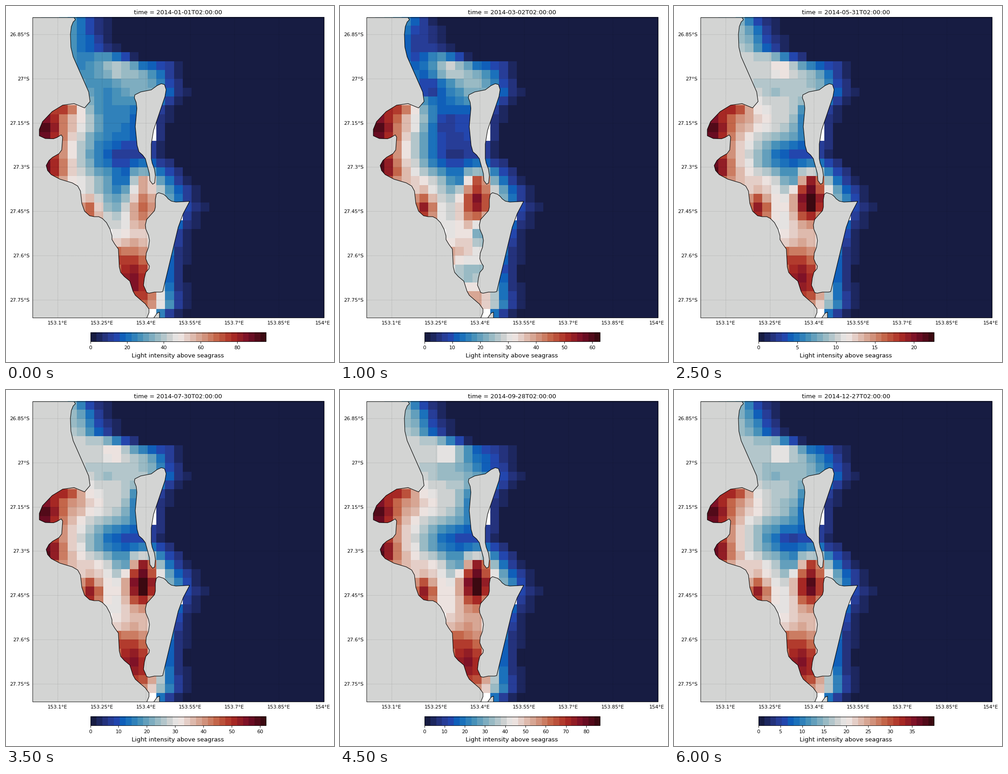
These frames come from a looping animation (718x779 px, 6500 ms). A matplotlib script:

```python
import numpy as np
import matplotlib.pyplot as plt
from matplotlib.animation import FuncAnimation
from matplotlib.colors import LinearSegmentedColormap

W, H, DPI = 718, 779, 64
X0, Y0, X1, Y1 = 57.5, 24.5, 695.7, 682.1    # map box in pixels
BX0, BX1, BY0, BY1 = 184.5, 569, 714.5, 734  # colour bar box
COLS, ROWS = 33, 34
BIG, SMALL = 13.17 * 72 / DPI, 10.97 * 72 / DPI
plt.rcParams["font.family"] = "DejaVu Sans"

STOPS = [(0, "#171c42"), (1 / 11, "#293a8f"), (0.137, "#2446ad"),
         (2 / 11, "#0b66bd"), (3 / 11, "#4590b9"), (4 / 11, "#8eb5c2"),
         (5 / 11, "#d2d4d3"), (0.5, "#f0eceb"), (6 / 11, "#e6d2cc"),
         (7 / 11, "#d59d89"), (8 / 11, "#c46548"), (9 / 11, "#ac2b24"),
         (10 / 11, "#780e28"), (1, "#3c0911")]
CMAP = LinearSegmentedColormap.from_list("balance", STOPS, N=30)
CMAP.set_bad("white")

# Highest light in each month, which sets the colour bar
PEAKS = [95.6, 33.5, 62.8, 76.5, 53, 22.6, 53.9, 62.1, 76.6, 86.8, 78.8, 58, 39.95]

# Column where the bright shallows end, at a few rows
EDGE_ROWS = [0, 3, 4, 5, 7, 8, 10, 12, 15, 17, 19, 21, 24, 28, 32, 33]
EDGE_COLS = [5.3, 6.7, 9.3, 13.8, 14.2, 14.6, 13, 12.2, 12.3, 14.2, 15.7,
             16.4, 15, 13.9, 14.7, 13.5]
FADE = 1.1
BAY_LIGHT = 0.45

# Gaussian mounds: height, centre column and row, widths in both directions
BANKS = [
    (0.50, 0.5, 12, 3, 3), (0.10, 5.5, 11.3, 2, 1.3), (0.25, 3.5, 9.7, 1.8, 0.9),
    (0.47, 0.5, 16.8, 3, 2.2), (0.08, 6, 18, 2, 1), (0.42, 6, 21.2, 1.5, 1.9),
    (0.10, 8.7, 5.5, 1.3, 1), (0.58, 12, 20.2, 1.9, 2.7),
    (0.25, 12.5, 18, 0.9, 0.6), (0.50, 11.5, 29, 3.5, 3.8),
    (0.15, 9, 26.5, 0.9, 0.8)]
CHANNELS = [
    (-0.30, 10, 15.2, 3.5, 2), (-0.15, 11.3, 11, 1, 2), (-0.20, 9.7, 18, 0.9, 1.2),
    (-0.20, 12.5, 4.7, 2, 0.9), (-0.07, 8, 7.5, 2, 1)]

# Share of light lost to murky water; negative means clearer
SUMMER = [(0.40, 5, 4, 3, 4), (0.45, 8.5, 11, 3.2, 5), (0.38, 10, 19.5, 5, 3),
          (-0.20, 14, 32, 2, 1.5)]
FLOOD = [(0.90, 5, 3, 2.5, 3.5), (0.95, 8.8, 12, 3, 4), (0.70, 6.5, 7.5, 1.8, 1.6),
         (-0.12, 4.5, 19, 3.5, 3), (0.95, 11, 28.6, 3, 2.5), (0.70, 12.5, 24, 1.1, 1.5)]
AUTUMN = [(0.40, 5, 3, 3, 4), (0.50, 9, 9.5, 4, 4), (0.72, 11, 29, 3, 2)]
SPRING = [(0.45, 13, 6.5, 3, 2), (-0.10, 10, 24, 2, 1.5)]

# When each kind of murk is present: key months and strengths
SEASONS = [(SUMMER, [0, 1, 2, 3, 10, 12], [1, 0, 0.4, 0, 0, 0.2]),
           (FLOOD, [0, 1, 2, 3], [0, 1, 0.6, 0]),
           (AUTUMN, [2, 3, 5], [0, 1, 0]),
           (SPRING, [7, 9, 12], [0, 1, 0.3])]

HOLES = [(13, 12), (13, 13), (13, 33), (8, 24), (16, 22)]  # cells without data

# Coastlines in pixels
MAINLAND = [
    (57, 24), (148, 24), (152, 30), (147, 35), (143, 45), (141, 62), (142, 90),
    (147, 111), (181, 188), (184, 209), (172, 223), (149, 213.5), (124, 217),
    (101, 231), (80, 253), (73, 270), (73, 284), (86, 290), (104, 290.5),
    (111, 288), (121, 282), (124, 287), (122, 315), (116, 323), (102, 331),
    (94, 338), (88, 349), (91, 360), (99, 369), (118, 379), (145, 387),
    (157, 394), (163, 405), (166, 432), (172, 449), (183, 459), (193, 461),
    (203, 461), (211, 465), (220, 474), (228, 489), (232, 503), (232, 511),
    (238, 521), (246, 532), (248, 571), (251, 583), (259, 592), (271, 602),
    (278, 624), (283, 633), (291, 640), (305, 652), (313, 663), (313, 671),
    (308, 683), (57, 683)]
NORTH_ISLAND = [
    (340, 170), (347, 172), (350.5, 183), (348, 198), (323, 272), (318, 302),
    (318, 334), (320, 344), (325, 357), (327, 371), (325.5, 387), (321, 390),
    (315, 382), (314, 367), (308, 345), (305, 334), (299, 326), (291, 319),
    (287, 305), (283, 264), (286.5, 224), (285, 211), (281, 201), (282, 194.5),
    (295, 188), (318, 183.5), (331, 174)]
SOUTH_ISLAND = [
    (334, 408.5), (345, 412), (351, 417), (355, 422), (362, 427), (372, 429),
    (402, 427.5), (388, 454), (377, 484), (343, 625), (338, 626), (325, 626),
    (313, 628.5), (308, 627), (301, 611), (303, 595), (306, 583), (313, 575),
    (314, 569), (310, 563), (306, 553), (307, 541), (312, 528), (314, 513),
    (312, 502), (306, 488), (305, 479), (308, 467), (325, 448), (327, 440),
    (327, 423), (329, 412)]
SPIT = [(323, 683), (331, 672), (336, 670), (336, 683)]

COL, ROW = np.meshgrid(np.arange(COLS), np.arange(ROWS))


def mounds(shapes):
    return sum(a * np.exp(-((COL - c) / sc) ** 2 - ((ROW - r) / sr) ** 2)
               for a, c, r, sc, sr in shapes)


EDGE = np.interp(ROW, EDGE_ROWS, EDGE_COLS)
CLEAR = (BAY_LIGHT + mounds(BANKS + CHANNELS)) / (1 + np.exp((COL - EDGE) / FADE))


def light(month):
    """Light relative to the month's peak, with gaps where there is no data."""
    loss = sum(np.interp(month, keys, strength) * mounds(murk)
               for murk, keys, strength in SEASONS)
    field = np.clip(CLEAR * np.clip(1 - loss, 0.05, None), 0, 1)
    for c, r in HOLES:
        field[r, c] = np.nan
    return np.ma.masked_invalid(field)


def tick_step(peak):
    return next(s for s in (1, 2, 2.5, 5, 10, 20) if peak / s <= 9)


fig = plt.figure(figsize=(W / DPI, H / DPI), dpi=DPI, facecolor="white")
ax = fig.add_axes([0, 0, 1, 1])
ax.axis("off")


def px(width):
    return width * 72 / DPI


def line(xs, ys, width=0.9, **kw):
    return ax.plot(xs, ys, color="black", lw=px(width), **kw)[0]


def label(x, y, text, size=SMALL, ha="center"):
    return ax.text(x, y, text, size=size, ha=ha, va="baseline")


def degrees(value, side):
    return f"{value:.2f}".rstrip("0").rstrip(".") + "°" + side


def box(x0, y0, x1, y1):
    ax.add_patch(plt.Rectangle((x0, y0), x1 - x0, y1 - y0, fill=False,
                               ec="black", lw=px(0.9), zorder=6))


def cells(values, x0, y0, x1, y1):
    return ax.imshow(values, cmap=CMAP, vmin=0, vmax=1, interpolation="nearest",
                     extent=(x0, x1, y1, y0), aspect="auto")


sea = cells(light(0), X0, Y0, X1, Y1)
cells(np.linspace(0, 1, 30)[None], BX0, BY0, BX1, BY1)

map_clip = plt.Rectangle((X0, Y0), X1 - X0, Y1 - Y0, transform=ax.transData)
for shape in (MAINLAND, NORTH_ISLAND, SOUTH_ISLAND, SPIT):
    land = ax.add_patch(plt.Polygon(shape, fc="#d3d4d3", ec="black",
                                    lw=px(1.1), zorder=3))
    land.set_clip_path(map_clip)

for k in range(7):
    x, y = 113 + 96.72 * k, 62.3 + 96.72 * k
    grid = dict(width=0.6, alpha=0.22, ls="--", zorder=4)
    line([x, x], [Y0, Y1], **grid)
    line([X0, X1], [y, y], **grid)
    label(x, 697, degrees(153.1 + 0.15 * k, "E"))
    label(51.5, y + 4, degrees(26.85 + 0.15 * k, "S"), ha="right")

box(X0, Y0, X1, Y1)
box(BX0, BY0, BX1, BY1)
label(376.5, 769, "Light intensity above seagrass", BIG)
title = label(376.5, 18, "", BIG)
ticks = [(line([0, 0], [BY1, BY1 + 4]), label(0, 751, "")) for _ in range(10)]

ax.set_xlim(0, W)
ax.set_ylim(H, 0)


def draw(month):
    day = np.datetime64("2014-01-01T02:00:00") + np.timedelta64(30 * month, "D")
    title.set_text(f"time = {day}")
    sea.set_data(light(month))
    peak = PEAKS[month]
    for k, (mark, text) in enumerate(ticks):
        value = k * tick_step(peak)
        x = BX0 + (BX1 - BX0) * value / peak
        mark.set_xdata([x, x])
        text.set_x(x)
        text.set_text(f"{value:g}")
        mark.set_visible(value <= peak)
        text.set_visible(value <= peak)
    return []


anim = FuncAnimation(fig, draw, frames=len(PEAKS), interval=500, repeat=True)
plt.show()
```
